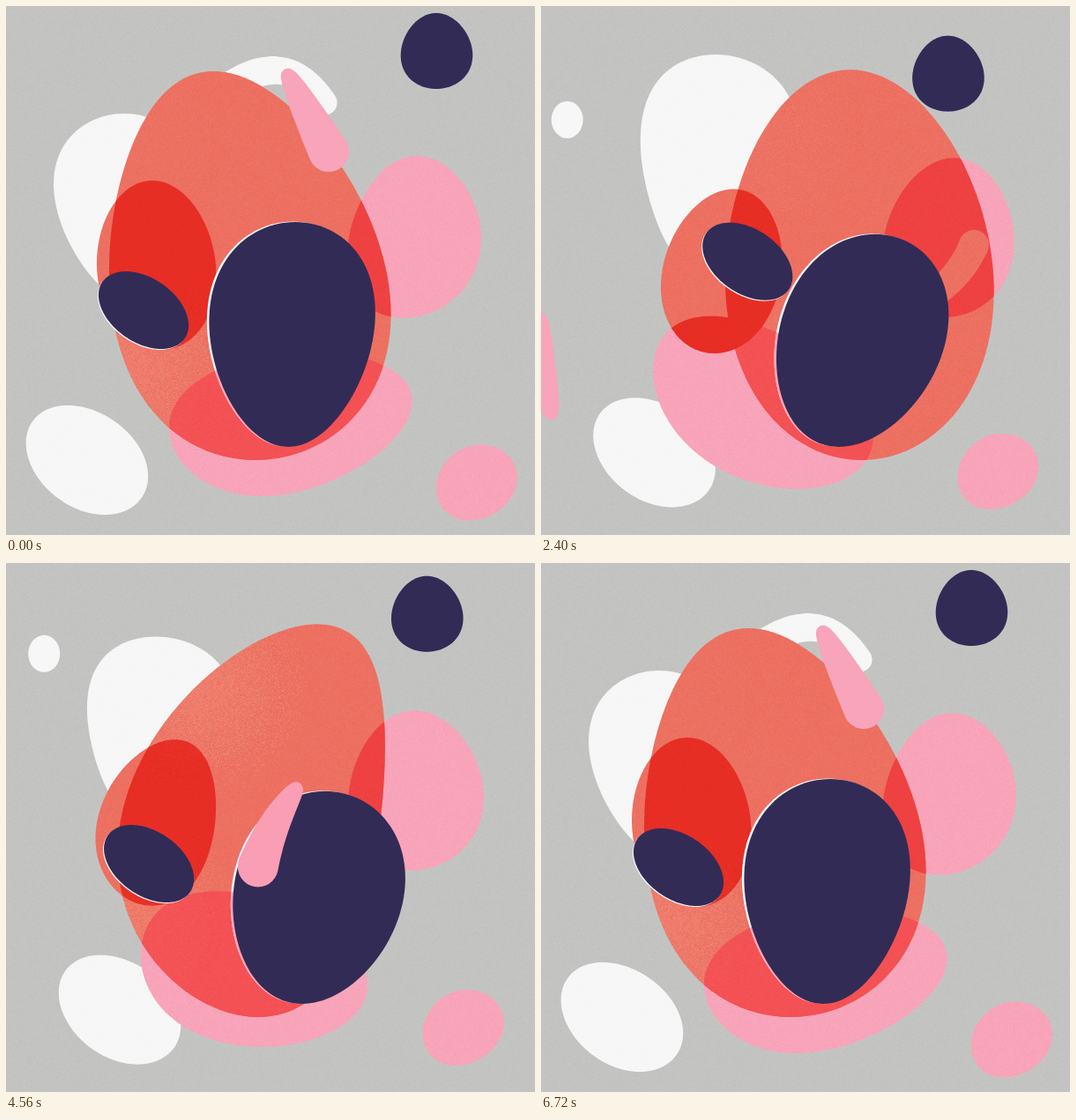
Write an HTML page with a canvas that moves like this. It is 600x600 px and loops after 6760 ms.

```html
<!DOCTYPE html>
<html lang="en">
<head>
<meta charset="utf-8">
<title>Drifting shapes</title>
<style>
  html, body { margin: 0; width: 100%; height: 100%; overflow: hidden; background: #c3c4c2; }
  canvas { display: block; width: 100vw; height: 100vh; }
</style>
</head>
<body>
<canvas id="stage" width="600" height="600"></canvas>
<script>
const ctx = document.getElementById('stage').getContext('2d');
const SIZE = 600, LOOP = 6760, CYCLE = 6720, STEP = 80, TURN = Math.PI * 2;
const GREY = '#c3c4c2', WHITE = '#f7f7f7', NAVY = '#322b56', PINK = '#f8a4ba',
  SALMON = '#ed7061', RED = '#e72d24', ROSE = '#ef4141', CORAL = '#f45154';

// Every value is a constant or a wave: [mean, cos, sin, cos 2, sin 2, ...].
// An oval is set by its top and bottom points, its sides at half height,
// and a taper that widens the lower half.
const egg = {
  top: [[311, -76, -10], [72, 2, 2]], bottom: [[312, -29, 43], 515],
  left: [153, -36, 43], right: [457, -27, 49], taper: [.11, .06, .04]
};
const cheek = {
  top: [[192, -26, 13], [202, -4, 4]], bottom: [[180, -4, 18], [391, -1, 3]],
  left: [115, -12, 19], right: [250, -12, 20], taper: .05
};
const chin = {
  top: [[260, 85, -18], [372, 20, -10]], bottom: [290, [551, 5, 0]],
  left: [158, 27, -9], right: [408, 45, -20], taper: [0, -.15, 0]
};
const ear = {
  top: [[466, 0, 3], [170, 0, 3]], bottom: [[456, -5, -2], [352, 2, 3]],
  left: 389, right: [539, 0, -3], taper: .12
};
const core = {
  top: [[356, -28, 7], [254, -9, -1]], bottom: [[331, -11, 0], 500],
  left: [252, -21, 4], right: [442, -25, 2], taper: [-.1, -.06, 0]
};
const sail = {
  top: [[167, -33, 13], [87, 35, -13]], bottom: [[158, -18, 15], [308, 26, 10]],
  left: [88, -31, 9], right: [249, -42, 15], taper: -.27
};

// Pebbles keep their form around a drifting centre.
const eye = {
  at: [[189, -26, 38, 0, 0, -7, 13], [320, 18, -27, 0, 0, 7, -10]],
  top: [-20, -44], bottom: [20, 44], left: -47, right: 47, taper: 0
};
const ink = {
  at: [[475.5, 12.5, -8], [62, -11, 10]],
  top: [0, -43], bottom: [0, 43], left: -40, right: 41, taper: .12
};
const blush = {
  at: [[523.5, 10, 1], [532, 8.5, 1.5]],
  top: [5, -43], bottom: [-8, 43], left: -45, right: 46, taper: 0
};
const pale = {
  at: [[116, -24, -3], [509.5, 5.5, .5]],
  top: [-22, -62], bottom: [20, 62], left: -66, right: 66, taper: 0
};

// Wanderers: time, x, y, degrees, bulge.
const petalKeys = [
  [0, 343, 122, 62, 0], [640, 281, 52, 25, 0], [1760, 18, 178, -94, 0],
  [2560, 0, 480, -94, 0], [3120, 0, 720, 20, 0], [3840, 206, 413, 117, 8], [5200, 357, 240, 98, 0]
];
const hookKeys = [
  [0, 310, 97, 11, -26], [640, 406, 154, 34, 0], [1760, 518, 233, 126, -20],
  [3040, 370, 375, 126, 0], [3840, 370, 375, 60, 0], [5200, 415, 268, 27, 0], [5760, 535, 200, 10, 0]
];
const upperLight = [.4, -.25, -.4], lowerLight = [.6, .25, -.25];

const clamp = v => Math.max(0, Math.min(1, v));

function wave(v, t) {
  if (!Array.isArray(v)) return v;
  const [mean, ...amps] = v;
  return amps.reduce((sum, a, i) => {
    const angle = (Math.floor(i / 2) + 1) * TURN * t / CYCLE;
    return sum + a * (i % 2 ? Math.sin(angle) : Math.cos(angle));
  }, mean);
}

// Returns a function from an angle (clockwise from the top) to a point.
function outline(shape, t) {
  const value = v => wave(v, t);
  const [dx, dy] = (shape.at || [0, 0]).map(value);
  const [tx, ty] = shape.top.map(value), [bx, by] = shape.bottom.map(value);
  const [l, r, taper] = [shape.left, shape.right, shape.taper].map(value);
  const mid = (l + r) / 2, lean = (tx - bx) / 2, bend = (tx + bx) / 2 - mid;
  return a => {
    const c = Math.cos(a);
    return [
      dx + mid + lean * c + bend * c * c + (r - l) / 2 * Math.sin(a) * (1 - taper * c),
      dy + (ty + by) / 2 - (by - ty) / 2 * c
    ];
  };
}

function oval(shape, t) {
  const point = outline(shape, t), path = new Path2D(), sides = 120;
  for (let i = 0; i < sides; i++) path.lineTo(...point(i / sides * TURN));
  path.closePath();
  return path;
}

// Smooth cyclic interpolation of keyed rows.
function sample(keys, t) {
  const n = keys.length;
  const row = k => keys[(k + n) % n];
  const time = k => row(k)[0] + Math.floor(k / n) * CYCLE;
  let i = n - 1;
  while (time(i) > t) i--;
  const span = time(i + 1) - time(i), u = (t - time(i)) / span, v = 1 - u;
  return row(i).slice(1).map((p, j) => {
    const q = row(i + 1)[j + 1];
    const m = (q - row(i - 1)[j + 1]) / (time(i + 1) - time(i - 1)) * span;
    const w = (row(i + 2)[j + 1] - p) / (time(i + 2) - time(i)) * span;
    return v * v * ((1 + 2 * u) * p + u * m) + u * u * ((3 - 2 * u) * q - v * w);
  });
}

// Overlapping discs along a bulging line form a tapered body.
function worm([x, y, deg, bulge], length, r0, r1, ease) {
  const path = new Path2D(), a = deg * TURN / 360, count = 90;
  const c = Math.cos(a), s = Math.sin(a);
  for (let k = 0; k <= count; k++) {
    const u = k / count, d = (u - .5) * length, h = bulge * (4 * u * (1 - u) - .1);
    const px = x + d * c - h * s, py = y + d * s + h * c;
    const r = r0 + (r1 - r0) * Math.pow(u, ease);
    path.moveTo(px + r, py);
    path.arc(px, py, r, 0, TURN);
  }
  return path;
}

function random(seed) {
  return () => (seed = (seed * 16807) % 2147483647) / 2147483647;
}

function texture(size, pixel) {
  const c = document.createElement('canvas');
  c.width = c.height = size;
  const g = c.getContext('2d'), img = g.createImageData(size, size);
  for (let i = 0; i < size * size; i++) {
    img.data.set(pixel(i % size, Math.floor(i / size)), i * 4);
  }
  g.putImageData(img, 0, 0);
  return c;
}

const rnd = random(71);
const grain = texture(SIZE, () => {
  const g = 255 * rnd();
  return [g, g, g, 13];
});
const speckle = texture(260, (x, y) => {
  const near = clamp(1 - Math.hypot(x - 130, y - 130) / 130);
  return [247, 165, 146, rnd() < near * .8 ? 170 : near * 60];
});

function fill(path, color) {
  ctx.fillStyle = color;
  ctx.fill(path);
}

function within(path, draw) {
  ctx.save();
  ctx.clip(path);
  draw();
  ctx.restore();
}

function glow([x, y], strength) {
  ctx.globalAlpha = clamp(strength);
  ctx.drawImage(speckle, Math.round(x - 130), Math.round(y - 130));
  ctx.globalAlpha = 1;
}

function rimmed(path, dx, dy, tint) {
  const rim = new Path2D();
  rim.addPath(path, new DOMMatrix([1, 0, 0, 1, dx, dy]));
  fill(rim, WHITE);
  within(rim, () => fill(tint, PINK));
  fill(path, NAVY);
}

function paint(t) {
  const [eggP, cheekP, chinP, earP, coreP, eyeP] =
    [egg, cheek, chin, ear, core, eye].map(shape => oval(shape, t));
  const hookP = worm(sample(hookKeys, t), 106, 17, 14, 1);
  const edge = outline(egg, t);
  const light = scale => {
    glow(edge(TURN * .87), wave(upperLight, t) * scale);
    glow(edge(TURN * .66), wave(lowerLight, t) * scale);
  };

  ctx.fillStyle = GREY;
  ctx.fillRect(0, 0, SIZE, SIZE);
  fill(oval(sail, t), WHITE);
  fill(oval(pale, t), WHITE);
  fill(oval(blush, t), PINK);
  fill(earP, PINK);
  fill(chinP, PINK);
  fill(hookP, WHITE);

  fill(cheekP, SALMON);
  fill(eggP, SALMON);
  within(eggP, () => {
    light(.5);
    fill(earP, ROSE);
    fill(hookP, SALMON);
    fill(chinP, CORAL);
    fill(cheekP, RED);
    light(.1);
  });
  within(cheekP, () => fill(chinP, RED));

  ctx.globalCompositeOperation = 'overlay';
  ctx.drawImage(grain, 0, 0);
  ctx.globalCompositeOperation = 'source-over';

  rimmed(eyeP, -1, 1, new Path2D());
  rimmed(coreP, -2.5, -.5, chinP);
  fill(oval(ink, t), NAVY);

  const deep = clamp(1 - Math.abs(t - 3840) / 800);
  fill(worm(sample(petalKeys, t), 98, 8, 23, .65),
    `rgb(${248 + 7 * deep}, ${164 - 56 * deep}, ${186 - 47 * deep})`);

  // The dot slips into the sail around the start of the loop.
  const tuck = Math.pow((1 + Math.cos(TURN * t / CYCLE)) / 2, 18);
  const dot = new Path2D();
  dot.ellipse(wave([36, 0, -8], t) + 64 * tuck, wave([119, 4, 16], t) + 57 * tuck, 18, 21, 0, 0, TURN);
  fill(dot, WHITE);
}

const start = performance.now();
let last = -1;
function tick() {
  const t = Math.floor((performance.now() - start) % LOOP / STEP) * STEP % CYCLE;
  if (t !== last) paint(last = t);
  requestAnimationFrame(tick);
}
tick();
</script>
</body>
</html>
```
